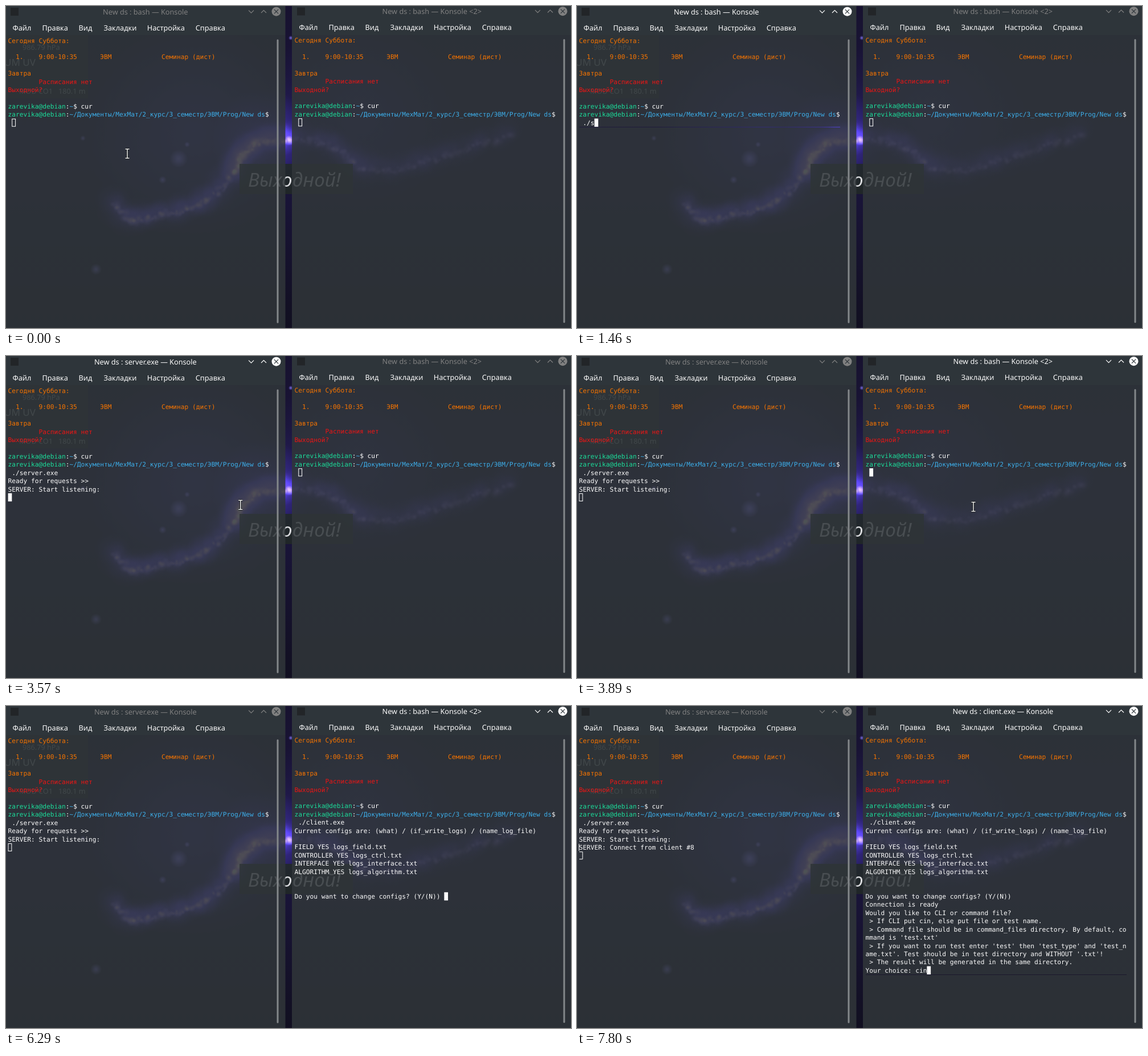
An HTML page with a canvas that plays this animation: 992 px wide and 565 px high, repeating every 8 s.

```html
<!DOCTYPE html>
<html lang="ru">
<head>
<meta charset="utf-8">
<title>Konsole</title>
<style>
  html, body { margin: 0; width: 100%; height: 100%; overflow: hidden; background: #14112a; }
  canvas { display: block; }
</style>
</head>
<body>
<canvas id="stage" width="992" height="565"></canvas>
<script>
const W = 992, H = 565, LOOP = 8000;
const CELL_W = 6.737, CELL_H = 14.42, TERM_X = 3.6, TERM_Y = 53.3;
const UI = '12.7px "Noto Sans", sans-serif';
const MONO = '11.19px "DejaVu Sans Mono", monospace';
const WHITE = '#fcfcfc', ORANGE = '#f67400', RED = '#ed1515', GREEN = '#1cdc9a', BLUE = '#3daee9';

const ctx = document.getElementById('stage').getContext('2d');
const layer = () => Object.assign(document.createElement('canvas'), { width: W, height: H });
const wallpaper = layer(), backdrop = layer();

// ---------- desktop behind the translucent windows ----------
function paintWallpaper() {
  const c = wallpaper.getContext('2d');
  let seed = 7;
  const random = () => (seed = seed * 16807 % 2147483647) / 2147483647;
  const jitter = n => (random() - 0.5) * n;

  function glow(x, y, r, rgb, alpha) {
    const g = c.createRadialGradient(x, y, 0, x, y, r);
    g.addColorStop(0, `rgba(${rgb},${alpha})`);
    g.addColorStop(1, `rgba(${rgb},0)`);
    c.fillStyle = g;
    c.fillRect(x - r, y - r, 2 * r, 2 * r);
  }

  function ridge(points, strength) {
    for (let i = 1; i < points.length; i++) {
      const [x0, y0] = points[i - 1], [x1, y1] = points[i];
      for (let k = 0; k < 1; k += 0.06) {
        const x = x0 + (x1 - x0) * k, y = y0 + (y1 - y0) * k;
        glow(x + jitter(24), y + jitter(20) - 6, 14 + random() * 20, '80,60,220', 0.12 * strength);
        glow(x + jitter(8), y + jitter(10), 3 + random() * 6, '190,160,225', 0.26 * strength);
      }
    }
  }

  const base = c.createLinearGradient(0, 0, 0, H);
  base.addColorStop(0, '#17122f');
  base.addColorStop(0.45, '#1c1640');
  base.addColorStop(1, '#110f20');
  c.fillStyle = base;
  c.fillRect(0, 0, W, H);

  c.globalCompositeOperation = 'lighter';
  glow(330, 220, 190, '50,45,140', 0.5);
  glow(450, 235, 90, '70,50,210', 0.5);
  glow(620, 190, 170, '40,35,110', 0.4);
  ridge([[490, 236], [440, 240], [415, 262], [400, 292], [370, 330], [320, 358], [270, 366], [222, 380], [188, 348]], 1);
  ridge([[490, 232], [545, 238], [590, 256], [625, 288], [690, 288], [760, 268], [830, 244], [890, 228]], 0.6);
  for (const [x, y, r] of [[303, 268, 16], [275, 305, 7], [158, 462, 10], [135, 232, 5], [500, 56, 4], [318, 243, 5], [497, 236, 9]]) {
    glow(x, y, r, '140,130,255', 0.7);
  }
  c.globalCompositeOperation = 'source-over';

  c.fillStyle = 'rgba(34,42,38,.85)';
  c.fillRect(0, 40, 144, 122);
  c.fillRect(410, 277, 199, 53);
  c.fillStyle = '#aab0b0';
  c.font = UI;
  c.fillText('986.79 hPa', 29, 77);
  c.fillText('180.1 m', 92, 153.5);
  c.textAlign = 'right';
  c.fillText('MOD CO1', 82, 153.5);
  c.textAlign = 'left';
  c.font = '17px "Noto Sans", sans-serif';
  c.fillText('UM UV', -3, 105);
  c.fillStyle = '#dcdde0';
  c.font = 'italic 33px "Noto Sans", sans-serif';
  c.fillText('Выходной!', 425, 316.5);
}

function paintBackdrop() {
  const c = backdrop.getContext('2d');
  c.drawImage(wallpaper, 0, 0);
  for (const [x, width] of [[0, 490.5], [502, 490]]) {
    c.fillStyle = 'rgba(48,54,58,.86)';
    c.fillRect(x, 51, width, H);
    c.fillStyle = '#2e353a';
    c.fillRect(x, 0, width, 51);
  }
}

// ---------- timing helpers ----------
const ramp = (t, from, to) => Math.min(1, Math.max(0, (t - from) / (to - from)));
const latest = (t, steps) => steps.reduce((value, [at, next]) => t >= at ? next : value, '');

// ---------- window parts, in window coordinates ----------
function line(width, color, ...points) {
  ctx.beginPath();
  points.forEach(([x, y]) => ctx.lineTo(x, y));
  ctx.lineWidth = width;
  ctx.strokeStyle = color;
  ctx.stroke();
}

const colX = col => TERM_X + col * CELL_W;
const rowY = row => TERM_Y + row * CELL_H;

function put(row, col, text, color = WHITE) {
  ctx.font = MONO;
  ctx.fillStyle = color;
  ctx.fillText(text, colX(col), rowY(row) + 11.2);
}

const putLines = (row, lines) => lines.forEach((text, i) => put(row + i, 0, text));

function cursor(row, col, filled) {
  const x = colX(col), y = rowY(row);
  ctx.fillStyle = ctx.strokeStyle = WHITE;
  ctx.lineWidth = 1;
  if (filled) ctx.fillRect(x, y, CELL_W, CELL_H);
  else ctx.strokeRect(x + 0.4, y + 0.7, CELL_W - 0.9, CELL_H - 1.4);
}

// The wallpaper shows through a one pixel gap below the row being edited.
function seam(win, row, fromCol) {
  const x = Math.round(win.x + colX(fromCol)), y = Math.round(win.y + rowY(row + 1));
  const width = Math.round(win.x + colX(68)) - x;
  ctx.globalAlpha = 0.75;
  ctx.drawImage(wallpaper, x, y, width, 1, x - win.x, y - win.y, width, 1);
  ctx.globalAlpha = 1;
}

function frame(title, active) {
  const level = Math.round(128 + 124 * active);
  const tone = `rgb(${level},${level},${level})`;
  ctx.fillStyle = '#222528';
  ctx.fillRect(8, 3, 14, 14);

  ctx.font = UI;
  ctx.fillStyle = tone;
  ctx.textAlign = 'center';
  ctx.fillText(title, 244.8, 14.5);
  ctx.textAlign = 'left';

  line(1.2, tone, [426, 7.7], [430.5, 12.2], [435, 7.7]);
  line(1.2, tone, [448, 12], [452.5, 7.5], [457, 12]);
  ctx.beginPath();
  ctx.arc(474.5, 9.7, 8, 0, 7);
  ctx.fill();
  line(1.2, '#2e353a', [470.9, 6.1], [478.1, 13.3]);
  line(1.2, '#2e353a', [478.1, 6.1], [470.9, 13.3]);

  ctx.fillStyle = WHITE;
  [['Файл', 11.5], ['Правка', 63.5], ['Вид', 127.5], ['Закладки', 171.5], ['Настройка', 247.8], ['Справка', 332.8]]
    .forEach(([label, x]) => ctx.fillText(label, x, 42.5));

  ctx.fillStyle = '#83878a';
  ctx.beginPath();
  ctx.roundRect(475.5, 58.5, 3, 498, 1.5);
  ctx.fill();

  put(0, 0, 'Сегодня Суббота:', ORANGE);
  put(2, 2, '1.', ORANGE);
  put(2, 8, '9:00-10:35', ORANGE);
  put(2, 24, 'ЭВМ', ORANGE);
  put(2, 40, 'Семинар (дист)', ORANGE);
  put(4, 0, 'Завтра', ORANGE);
  put(5, 8, 'Расписания нет', RED);
  put(6, 0, 'Выходной?', RED);
  prompt(8, '~', ' cur');
  prompt(9, '~/Документы/МехМат/2_курс/3_семестр/ЭВМ/Prog/New ds', '');
}

function prompt(row, path, command) {
  put(row, 0, 'zarevika@debian', GREEN);
  put(row, 15, ':');
  put(row, 16, path, BLUE);
  put(row, 16 + path.length, '$' + command);
}

function pointer(x, y) {
  for (const [width, color] of [[3.4, '#15181a'], [1.4, WHITE]]) {
    line(width, color, [x - 3.5, y - 8], [x + 3.5, y - 8]);
    line(width, color, [x - 3.5, y + 8], [x + 3.5, y + 8]);
    line(width, color, [x, y - 8], [x, y + 8]);
  }
}

// ---------- the two sessions ----------
const SWITCH = 3750;
const left = { x: 0, y: 0 }, right = { x: 503, y: -0.5 };

const CONFIGS = [
  'Current configs are: (what) / (if_write_logs) / (name_log_file)',
  '',
  'FIELD YES logs_field.txt',
  'CONTROLLER YES logs_ctrl.txt',
  'INTERFACE YES logs_interface.txt',
  'ALGORITHM YES logs_algorithm.txt',
  '', '',
  'Do you want to change configs? (Y/(N)) '
];
const CHOICES = [
  'Connection is ready',
  'Would you like to CLI or command file?',
  ' > If CLI put cin, else put file or test name.',
  ' > Command file should be in command_files directory. By default, co',
  "mmand is 'test.txt'",
  " > If you want to run test enter 'test' then 'test_type' and 'test_n",
  "ame.txt'. Test should be in test directory and WITHOUT '.txt'!",
  ' > The result will be generated in the same directory.'
];

function serverSession(t) {
  const focused = t >= 200 && t < SWITCH;
  frame(`New ds : ${t < 2940 ? 'bash' : 'server.exe'} — Konsole`, ramp(t, 200, 340) - ramp(t, SWITCH, 3890));
  const typed = latest(t, [[0, ' '], [1460, ' ./s'], [1570, ' ./se'], [1830, ' ./server.exe ']]);
  if (t >= 1460 && t < 2460) seam(left, 10, 0);
  put(10, 0, typed);
  if (t < 2460) return cursor(10, typed.length, focused);

  putLines(11, ['Ready for requests >>', 'SERVER: Start listening:']);
  if (t < 6740) return cursor(13, 0, focused);

  put(13, 0, 'SERVER: Connect from client #8');
  const x = colX(0), y = rowY(14), end = x + CELL_W - 0.5;
  line(1, WHITE, [x, y - CELL_H + 1], [x, y - 1]);
  line(1, WHITE, [x + 0.5, y + 0.7], [end, y + 0.7], [end, y + 13.5], [x + 0.5, y + 13.5]);
}

function clientSession(t) {
  const focused = t >= SWITCH;
  frame(t < 6430 ? 'New ds : bash — Konsole <2>' : 'New ds : client.exe — Konsole', ramp(t, SWITCH, 3890));
  const typed = latest(t, [[0, ' '], [4490, ' .'], [4540, ' ./'], [4740, ' ./c'], [5290, ' ./cl'], [5430, ' ./client.exe ']]);
  if (t >= 4490 && t < 6290) seam(right, 10, typed.length + 1);
  put(10, 0, typed);
  if (t < 6290) return cursor(10, typed.length, focused);

  putLines(11, CONFIGS);
  if (t < 6740) return cursor(19, CONFIGS.at(-1).length, focused);

  putLines(20, CHOICES);
  const answer = 'Your choice: ' + latest(t, [[7370, 'c'], [7660, 'ci'], [7800, 'cin']]);
  if (t >= 7370) seam(right, 28, 0);
  put(28, 0, answer);
  cursor(28, answer.length, focused);
}

function draw() {
  const t = performance.now() % LOOP;
  ctx.drawImage(backdrop, 0, 0);
  for (const [win, session] of [[left, serverSession], [right, clientSession]]) {
    ctx.save();
    ctx.translate(win.x, win.y);
    session(t);
    ctx.restore();
  }
  // The pointer hides while keys are being typed.
  if (t < 1460 || (t >= 3460 && t < 4490)) {
    const k = ramp(t, 3430, SWITCH), eased = k * k * (3 - 2 * k);
    pointer(213 + 483 * eased, 259 + 5.5 * eased);
  }
  requestAnimationFrame(draw);
}

ctx.textRendering = 'geometricPrecision';
paintWallpaper();
paintBackdrop();
draw();
</script>
</body>
</html>
```
